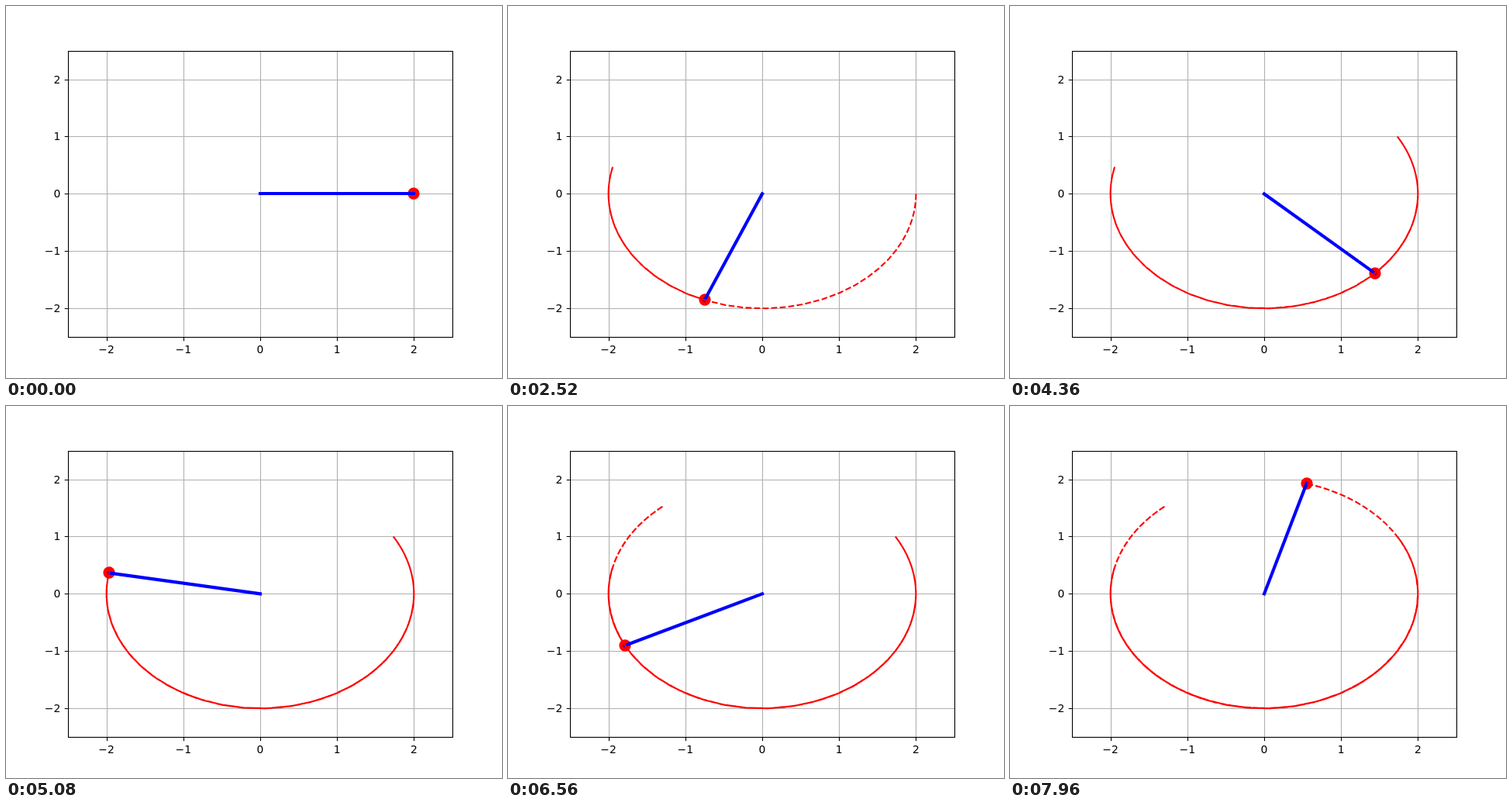
An HTML page that plays this animation: 640x480 px, repeating every 8 s.

```html
<!DOCTYPE html>
<html lang="en">
<head>
<meta charset="utf-8">
<title>Pendulum</title>
<style>
  html, body { margin: 0; width: 100%; height: 100%; overflow: hidden; background: #fff; }
  svg { display: block; width: 640px; height: 480px; }
  text { font: 13.89px "DejaVu Sans", sans-serif; }
  .x { text-anchor: middle; }
  .y { text-anchor: end; }
  path, polyline, rect { fill: none; stroke-width: 1.11; }
  #grid { stroke: #b0b0b0; }
  #ticks, #frame { stroke: #000; }
  #bob { fill: #f00; }
  #rod { stroke: #00f; stroke-width: 4.17; stroke-linecap: square; }
  #trail { stroke: #f00; stroke-width: 2.083; stroke-dasharray: 7.708 3.333; stroke-linejoin: round; }
</style>
</head>
<body>
<svg viewBox="0 0 640 480">
  <path id="grid"/>
  <circle id="bob" r="7.64"/>
  <path id="rod"/>
  <polyline id="trail"/>
  <path id="ticks"/>
  <rect id="frame" x="80.5" y="58.5" width="496" height="369"/>
  <g id="labels"></g>
</svg>
<script>
const STEP_MS = 40, STEPS = 200;
const GRAVITY = 9.81, LENGTH = 2, DT = STEP_MS / 1000;
const $ = id => document.getElementById(id);
const px = x => 328 + 99.2 * x;
const py = y => 242.4 - 73.92 * y;

function drawAxes() {
  let grid = '', ticks = '';
  const label = (kind, x, y, value) => {
    const text = document.createElementNS('http://www.w3.org/2000/svg', 'text');
    text.setAttribute('class', kind);
    text.setAttribute('x', x);
    text.setAttribute('y', y);
    text.textContent = String(value).replace('-', '\u2212');
    $('labels').append(text);
  };
  for (let v = -2; v <= 2; v++) {
    const x = Math.round(px(v)) + 0.5, y = Math.round(py(v)) + 0.5;
    grid += `M${x} 58V427M80 ${y}H576`;
    ticks += `M${x} 427.5v4.86M80.5 ${y}h-4.86`;
    label('x', px(v), 448, v);
    label('y', 70.3, y + 4.5, v);
  }
  $('grid').setAttribute('d', grid);
  $('ticks').setAttribute('d', ticks);
}

// Explicit Euler steps: the swing gains energy as it goes.
function simulate() {
  const points = [];
  let angle = Math.PI / 2, speed = 0;
  for (let i = 0; i < STEPS; i++) {
    points.push([px(LENGTH * Math.sin(angle)), py(-LENGTH * Math.cos(angle))]);
    const accel = -GRAVITY / LENGTH * Math.sin(angle);
    angle += speed * DT;
    speed += accel * DT;
  }
  return points;
}

const points = simulate();
let shown = -1;

function draw() {
  const step = Math.floor(performance.now() / STEP_MS) % STEPS;
  if (step !== shown) {
    shown = step;
    const [x, y] = points[step];
    $('bob').setAttribute('cx', Math.round(x));
    $('bob').setAttribute('cy', Math.round(y));
    // A level rod sits on whole pixels.
    $('rod').setAttribute('d', step < 2 ? 'M328 242H526' : `M328 242.4L${x} ${y}`);
    $('trail').setAttribute('points', step < 2 ? '' : points.slice(0, step + 1).join(' '));
  }
  requestAnimationFrame(draw);
}

drawAxes();
draw();
</script>
</body>
</html>
```
